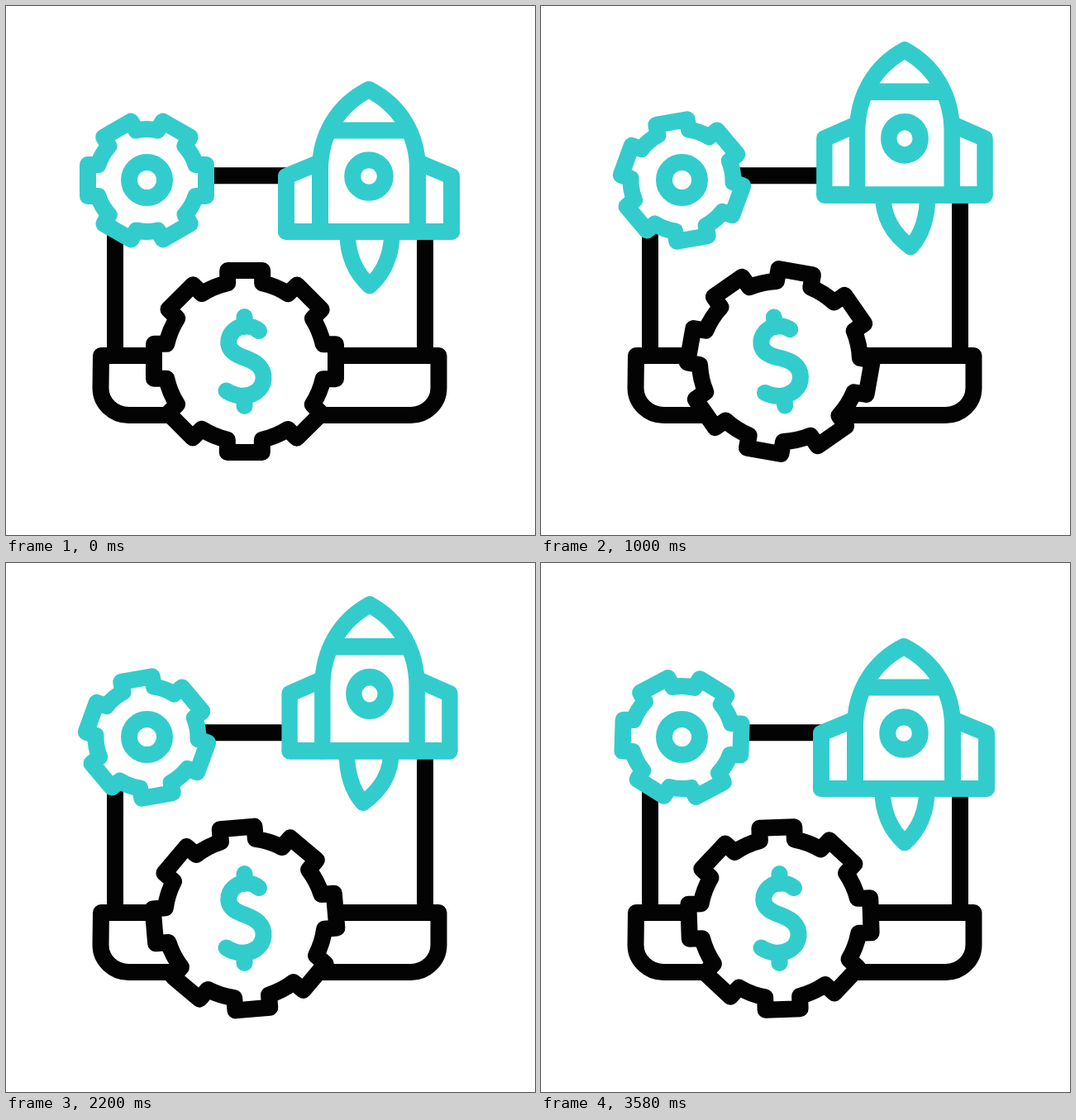
An HTML page with a canvas that plays this animation: 640x640 px, repeating every 3.6 s.

```html
<!DOCTYPE html>
<html lang="en">
<head>
<meta charset="utf-8">
<title>Startup launch icon</title>
<style>
  html, body { margin: 0; width: 100%; height: 100%; overflow: hidden; background: #fff; }
  canvas { display: block; width: 100vw; height: 100vh; }
</style>
</head>
<body>
<canvas id="stage" width="640" height="640"></canvas>
<script>
const ctx = document.getElementById('stage').getContext('2d');
const LOOP = 3600;
const TEAL = '#33cccc';
const BLACK = '#030303';
const DEG = Math.PI / 180;

const clamp01 = v => Math.min(1, Math.max(0, v));
const smooth = v => v * v * (3 - 2 * v);

// Linear interpolation through [time, value] pairs.
function track(keys, t) {
  if (t <= keys[0][0]) return keys[0][1];
  for (let i = 1; i < keys.length; i++) {
    const [t0, a] = keys[i - 1], [t1, b] = keys[i];
    if (t < t1) return a + (b - a) * (t - t0) / (t1 - t0);
  }
  return keys[keys.length - 1][1];
}

// Degrees for the dollar sign, sideways pixels for the flame tip.
const DOLLAR_SWING = [[400, 0], [700, -10.6], [1300, -3.7], [1620, 0]];
const FLAME_SWING = [[520, 0], [700, 11], [2200, -8], [2340, -9.6], [2740, 7], [3200, 0]];

// 0 = parked, 1 = hovering.
function liftAt(t) {
  if (t < 520) return 0;
  const rise = 1 - Math.exp(-(t - 520) / 171);
  return rise * (1 - smooth(clamp01((t - 2725) / 515)));
}

const outline = {
  base: new Path2D('M115 423H523.5V462A34 33 0 0 1 489 495H149A34 33 0 0 1 114.5 462Z'),
  screen: new Path2D('M132 423V205.3H507V423'),
  dollar: new Path2D('M17.5 -37C8 -45 -5 -44 -12 -38C-22 -29 -22 -16 -10 -9' +
    'C-2 -4 9 -3 17 5C26 14 25 29 14 37C3 44 -10 43 -22 35.5M0 -54V-42M0 54V42'),
  hull: new Path2D('M380 273V198C380 155 402 120 439 101C476 120 498 155 498 198V273'),
  fins: new Path2D('M380 189L339 206V273H539V206L498 189'),
  floor: new Path2D('M339 273H539'),
  band: new Path2D('M395 150.5H483')
};

function paint(path, color, filled) {
  if (filled) {
    ctx.fillStyle = '#fff';
    ctx.fill(path);
  }
  ctx.strokeStyle = color;
  ctx.stroke(path);
}

function at(x, y, angle, draw) {
  ctx.save();
  ctx.translate(x, y);
  ctx.rotate(angle * DEG);
  draw();
  ctx.restore();
}

function ring(x, y, r) {
  const path = new Path2D();
  path.arc(x, y, r, 0, 2 * Math.PI);
  paint(path, TEAL, true);
}

function gearPath(teeth, outer, inner, half) {
  const path = new Path2D();
  const step = 2 * Math.PI / teeth;
  const rootAngle = Math.asin(half / inner);
  const tipAngle = Math.atan2(half, outer);
  const tip = Math.hypot(half, outer);
  for (let i = 0; i < teeth; i++) {
    const a = i * step;
    path.lineTo(tip * Math.cos(a - tipAngle), tip * Math.sin(a - tipAngle));
    path.lineTo(tip * Math.cos(a + tipAngle), tip * Math.sin(a + tipAngle));
    path.arc(0, 0, inner, a + rootAngle, a + step - rootAngle);
  }
  path.closePath();
  return path;
}

// The roots stay under the hull while the tip bends sideways.
function flamePath(bend, length) {
  const path = new Path2D();
  const root = 0.1 * bend, belly = 0.5 * bend;
  path.moveTo(root - 27, 0);
  path.bezierCurveTo(root - 27, 0.41 * length, belly - 18, 0.75 * length, bend, length);
  path.bezierCurveTo(belly + 18, 0.75 * length, root + 27, 0.41 * length, root + 27, 0);
  return path;
}

const smallGear = gearPath(6, 71.5, 62, 19);
const bigGear = gearPath(8, 110, 97, 21);

function drawRocket(t) {
  const lift = liftAt(t);
  const top = 101 - 50.7 * lift;
  const bottom = 273 - 45.7 * (1 - Math.pow(1 - lift, 1.28));

  ctx.lineWidth = 19.5;
  const flame = flamePath(track(FLAME_SWING, t), 65.5 - 2.5 * lift);
  at(440, bottom, 0, () => paint(flame, TEAL, true));

  ctx.save();
  ctx.translate(439 + lift, bottom);
  ctx.scale(1 - 0.031 * lift, (bottom - top) / 172);
  ctx.translate(-439, -273);
  ctx.lineWidth = 20;
  paint(outline.fins, TEAL, true);
  paint(outline.hull, TEAL, true);
  paint(outline.floor, TEAL);
  paint(outline.band, TEAL);
  ring(439, 206, 19.8);
  ctx.restore();
}

function draw(t) {
  const turn = 360 * t / LOOP;
  ctx.fillStyle = '#fff';
  ctx.fillRect(0, 0, 640, 640);
  ctx.lineCap = ctx.lineJoin = 'round';

  ctx.lineWidth = 20;
  paint(outline.screen, BLACK);
  paint(outline.base, BLACK, true);

  at(170.5, 211, -turn, () => paint(smallGear, TEAL, true));
  ring(170.5, 210.5, 21.5);

  drawRocket(t);

  ctx.lineWidth = 20;
  at(289, 430, turn, () => paint(bigGear, BLACK, true));
  at(288.5, 430, track(DOLLAR_SWING, t), () => paint(outline.dollar, TEAL));
}

const start = performance.now();
function tick() {
  draw((performance.now() - start) % LOOP);
  requestAnimationFrame(tick);
}
tick();
</script>
</body>
</html>
```
